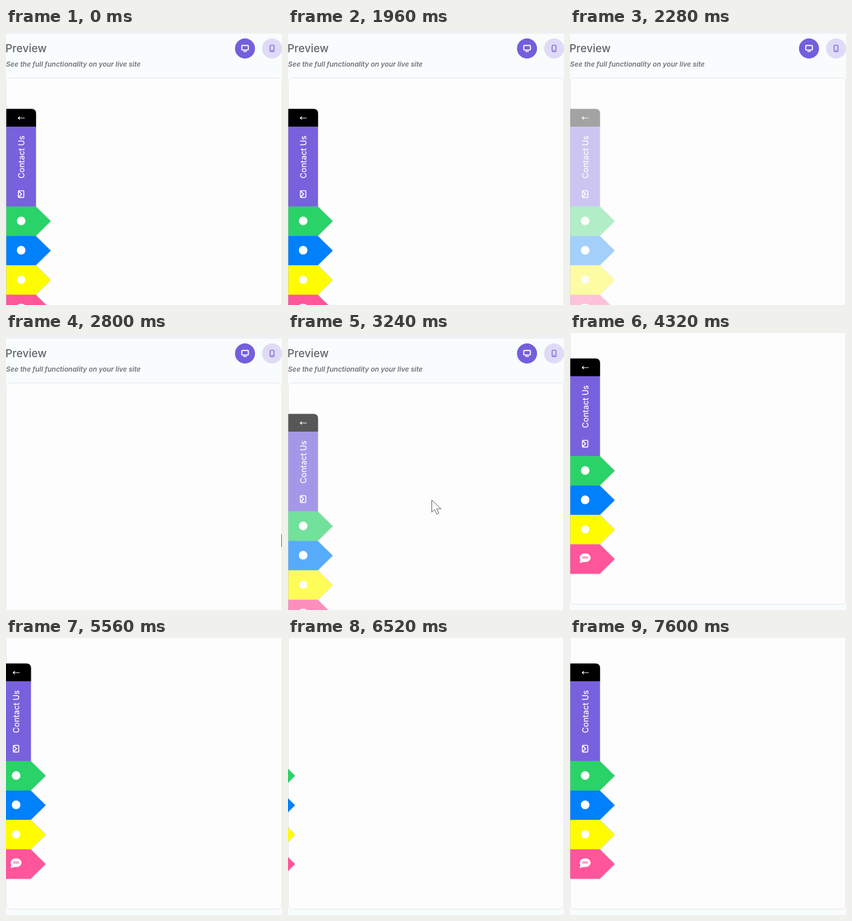
Write an HTML page that moves like this. It is 479 px wide and 480 px high and loops after 8000 ms.

```html
<!DOCTYPE html>
<html lang="en">
<head>
<meta charset="utf-8">
<title>Contact bar preview</title>
<style>
  html, body { margin: 0; width: 100%; height: 100%; overflow: hidden; background: #f8fcfd; }
  svg { display: block; width: 100%; height: 100%; }
  text { font-family: Inter, "Open Sans", sans-serif; }
  .line { fill: none; stroke-linecap: round; stroke-linejoin: round; }
  #bar { filter: drop-shadow(0 0 1px rgba(0, 0, 0, .3)); }
</style>
</head>
<body>
<svg viewBox="0 0 479 480">
  <defs>
    <path id="tab" d="M0 0H51L77 25.5L51 51H0Z"/>
  </defs>
  <g id="page">
    <rect width="479" height="620" fill="#f8fcfd"/>
    <rect width="479" height="10" fill="#f0f0f1"/>
    <text x="-1" y="41.5" font-size="18.8" font-weight="500" fill="#626567">Preview</text>
    <text x="0" y="67.4" font-size="11.9" font-weight="600" font-style="italic" fill="#707476">See the full functionality on your live site</text>

    <circle cx="414.8" cy="35.5" r="17.4" fill="#735fdc"/>
    <g class="line" stroke="#fff" stroke-width="1.9">
      <rect x="409.2" y="30.3" width="11.4" height="7.8" rx="1"/>
      <path d="M412.6 40.6h4.6"/>
    </g>
    <circle cx="461.8" cy="35.5" r="17.4" fill="#dfdbf6"/>
    <g class="line" stroke="#735fdc" stroke-width="1.4">
      <rect x="458.4" y="29.9" width="6.8" height="10.8" rx="1.5"/>
      <path d="M461.3 38.5h1"/>
    </g>

    <rect x=".5" y="86.5" width="478" height="479.5" rx="8" fill="#fdfdfd" stroke="#e2e4ea"/>

    <g id="bar">
      <path d="M0 140H43.5Q51.5 140 51.5 148V171H0Z" fill="#000"/>
      <path class="line" d="M31.5 155.7H20.5M23.3 153.5L20.5 155.7L23.3 157.9" stroke="#fff" stroke-width="1.1"/>
      <rect y="170.6" width="51.3" height="138.6" fill="#7761dd"/>
      <text transform="translate(31.3 260.5) rotate(-90)" font-size="14" font-weight="500" fill="#fff">Contact Us</text>
      <g class="line" stroke="#fff" stroke-width="1.6">
        <rect x="20.9" y="281.7" width="9.4" height="11.6" rx="1.2"/>
        <path d="M22 283.1L26.6 287.5L22 291.9"/>
      </g>
      <use href="#tab" y="309" fill="#29d367"/>
      <use href="#tab" y="360" fill="#0080fa"/>
      <use href="#tab" y="411" fill="#fffc00"/>
      <use href="#tab" y="462" fill="#ff559b"/>
      <g fill="#fff">
        <circle cx="25.7" cy="334" r="7.5"/>
        <circle cx="25.7" cy="384.8" r="7.5"/>
        <circle cx="25.7" cy="436" r="7"/>
        <ellipse cx="25.7" cy="485" rx="9.6" ry="7.6"/>
        <path d="M17.7 487L16.2 494.5L24.7 492Z"/>
      </g>
      <text x="25.7" y="487" font-size="5" font-weight="700" text-anchor="middle" fill="#ff559b">SMS</text>
    </g>
  </g>
  <path id="cursor" d="M0 0V21L5 16.5L8.7 24.5L12.3 23L8.8 15.2H16Z" fill="#fdfdfd" stroke="#55585b"/>
</svg>
<script>
  const LOOP = 8000;
  const SCROLL = 96;
  const WIDTH = 78;
  const INSET = { x: .6, y: .3 };
  const [page, bar, cursor] = ["page", "bar", "cursor"].map(id => document.getElementById(id));

  const part = (t, from, to) => Math.min(1, Math.max(0, (t - from) / (to - from)));
  const swing = p => (1 - Math.cos(Math.PI * p)) / 2;
  const easeOut = p => 1 - (1 - p) ** 2;
  const move = (el, x, y) => el.setAttribute("transform", `translate(${x} ${y})`);

  function draw(t) {
    // The bar fades away and back, then slides away and back.
    const shown = t < 2760
      ? 1 - swing(part(t, 1960, 2500))
      : easeOut(part(t, 3020, 3560));
    const slid = t < 6200
      ? swing(part(t, 5440, 6000))
      : 1 - easeOut(part(t, 6450, 7240));
    bar.setAttribute("opacity", shown);
    move(bar, INSET.x - (WIDTH + 1) * slid, INSET.y);
    move(page, 0, -SCROLL * swing(part(t, 3640, 4200)));

    const enter = 1 - easeOut(part(t, 2800, 3200));
    move(cursor, 249.5 + 230 * enter, 289.5 + 60 * enter);
    cursor.setAttribute("visibility", t > 2800 && t < 4280 ? "visible" : "hidden");
  }

  function tick() {
    draw(performance.now() % LOOP);
    requestAnimationFrame(tick);
  }
  tick();
</script>
</body>
</html>
```
